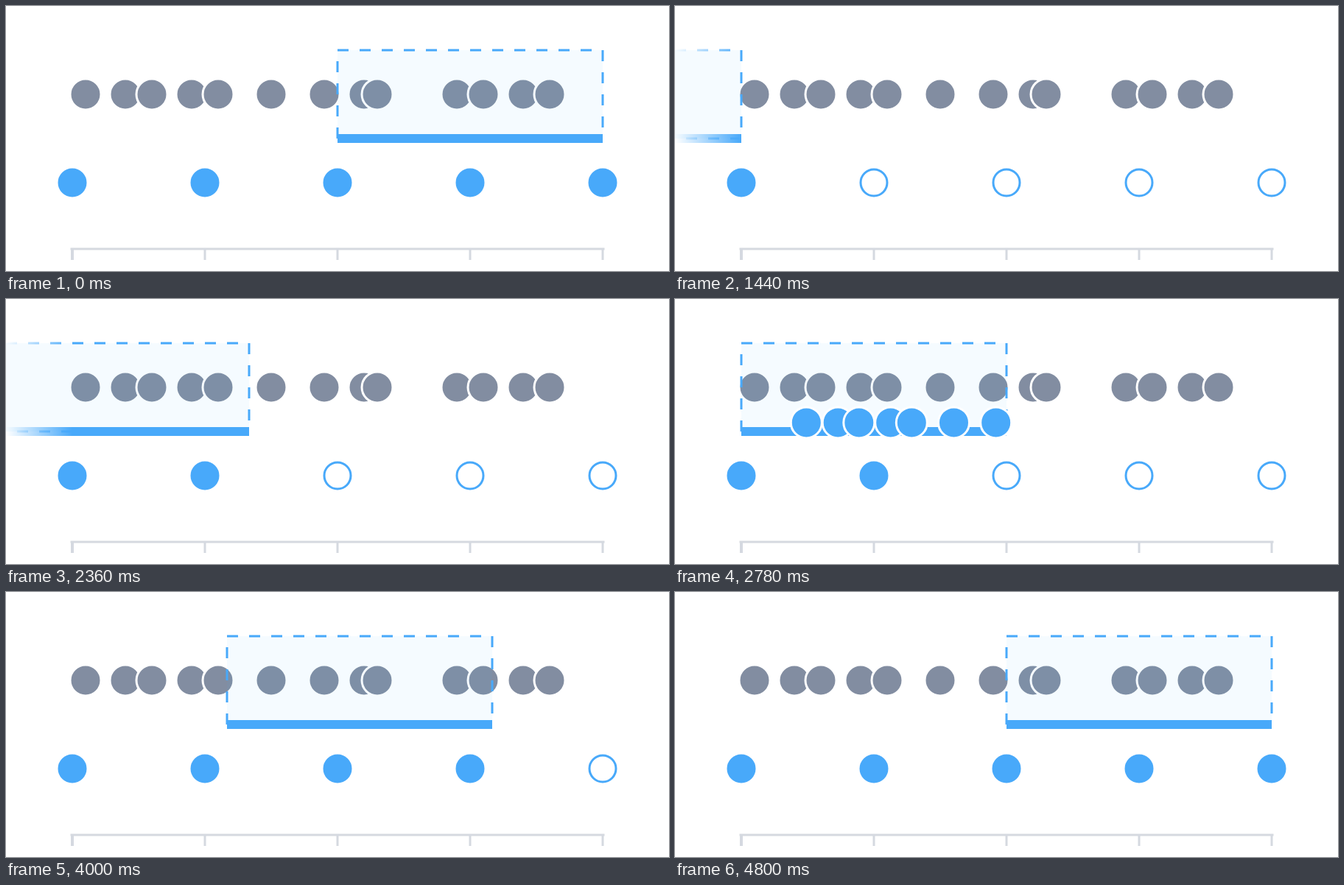
Animation, 900 px wide and 360 px high, one loop 5040 ms. Source, as an HTML page with a canvas:

```html
<!DOCTYPE html>
<html lang="en">
<head>
<meta charset="utf-8">
<title>Sliding window</title>
<style>
  html, body { margin: 0; width: 100%; height: 100%; overflow: hidden; background: #fff; }
  canvas { display: block; width: 900px; height: 360px; }
</style>
</head>
<body>
<canvas id="stage" width="900" height="360"></canvas>
<script>
const ctx = document.getElementById('stage').getContext('2d');

const BLUE = '#48a9fa', GREY = '#828da1', AXIS = '#d5d9e0';
const LOOP = 5040, STEP = 20;
const START = 600, MOVE = 240, WAIT = 120, DROP = 480;
const CYCLE = MOVE + WAIT + DROP;
const LEFT = 90, GAP = 180, SPAN = 360, COUNT = 5;
const TOP = 60, BALL_Y = 120, BAR_Y = 180, RING_Y = 240, AXIS_Y = 330;

const balls = [-7, 1, 4, 6, 9, 11, 15, 19, 22, 23, 29, 31, 34, 36].map(n => LEFT + n * 18);
const slotX = i => LEFT + i * GAP;

// Window outlines fade out towards the left edge of the stage.
const fade = ctx.createLinearGradient(0, 0, LEFT, 0);
fade.addColorStop(0, 'rgba(72,169,250,0)');
fade.addColorStop(1, BLUE);

function bezier(a, b, c, d, p) {
  const q = 1 - p;
  return a * q * q * q + 3 * b * q * q * p + 3 * c * q * p * p + d * p * p * p;
}

function line(x1, y1, x2, y2, width, color) {
  ctx.lineWidth = width;
  ctx.strokeStyle = color;
  ctx.beginPath();
  ctx.moveTo(x1, y1);
  ctx.lineTo(x2, y2);
  ctx.stroke();
}

function circle(x, y, r, fill, stroke) {
  ctx.beginPath();
  ctx.arc(x, y, r, 0, Math.PI * 2);
  ctx.fillStyle = fill;
  ctx.fill();
  ctx.lineWidth = 3;
  ctx.strokeStyle = stroke;
  ctx.stroke();
}

const ball = (x, y, color) => circle(x, y, 21, color, '#fff');

function drawAxis() {
  line(87.5, AXIS_Y, 812.5, AXIS_Y, 3, AXIS);
  for (let i = 0; i < COUNT; i++) {
    line(slotX(i), AXIS_Y, slotX(i), AXIS_Y + 15, i ? 3 : 4, AXIS);
  }
}

function drawWindow(right) {
  const x = right - SPAN;
  ctx.fillStyle = 'rgba(72,169,250,0.05)';
  ctx.fillRect(x, TOP, SPAN, BAR_Y - TOP);
  ctx.setLineDash([15, 15]);
  ctx.lineWidth = 3;
  ctx.strokeStyle = fade;
  ctx.strokeRect(x, TOP, SPAN, BAR_Y - TOP);
  ctx.setLineDash([]);
  line(x, BAR_Y, right, BAR_Y, 12, fade);
}

function drawDrop(right, p) {
  for (const x of balls) {
    if (x <= right - SPAN || x > right) continue;
    ball(bezier(x, x, right, right, p), bezier(BALL_Y, 210, 150, RING_Y, p), BLUE);
  }
}

function draw(time) {
  let t = Math.floor((time % LOOP) / STEP) * STEP;
  if (t < STEP) t += LOOP;
  const since = Math.min(t - START, COUNT * CYCLE);
  const cycle = Math.floor(since / CYCLE);
  const local = since - cycle * CYCLE;
  const right = LEFT + GAP * (cycle - 1 + Math.min(local / MOVE, 1));
  const p = (local - MOVE - WAIT) / DROP;

  ctx.fillStyle = '#fff';
  ctx.fillRect(0, 0, 900, 360);
  drawAxis();
  balls.forEach(x => ball(x, BALL_Y, GREY));
  if (since >= 0) drawWindow(right);
  for (let i = 0; i < COUNT; i++) {
    circle(slotX(i), RING_Y, 18, i < cycle ? BLUE : '#fff', BLUE);
  }
  if (since >= 0 && p >= 0) drawDrop(right, p);
}

const begin = performance.now();
function tick() {
  draw(performance.now() - begin);
  requestAnimationFrame(tick);
}
tick();
</script>
</body>
</html>
```
